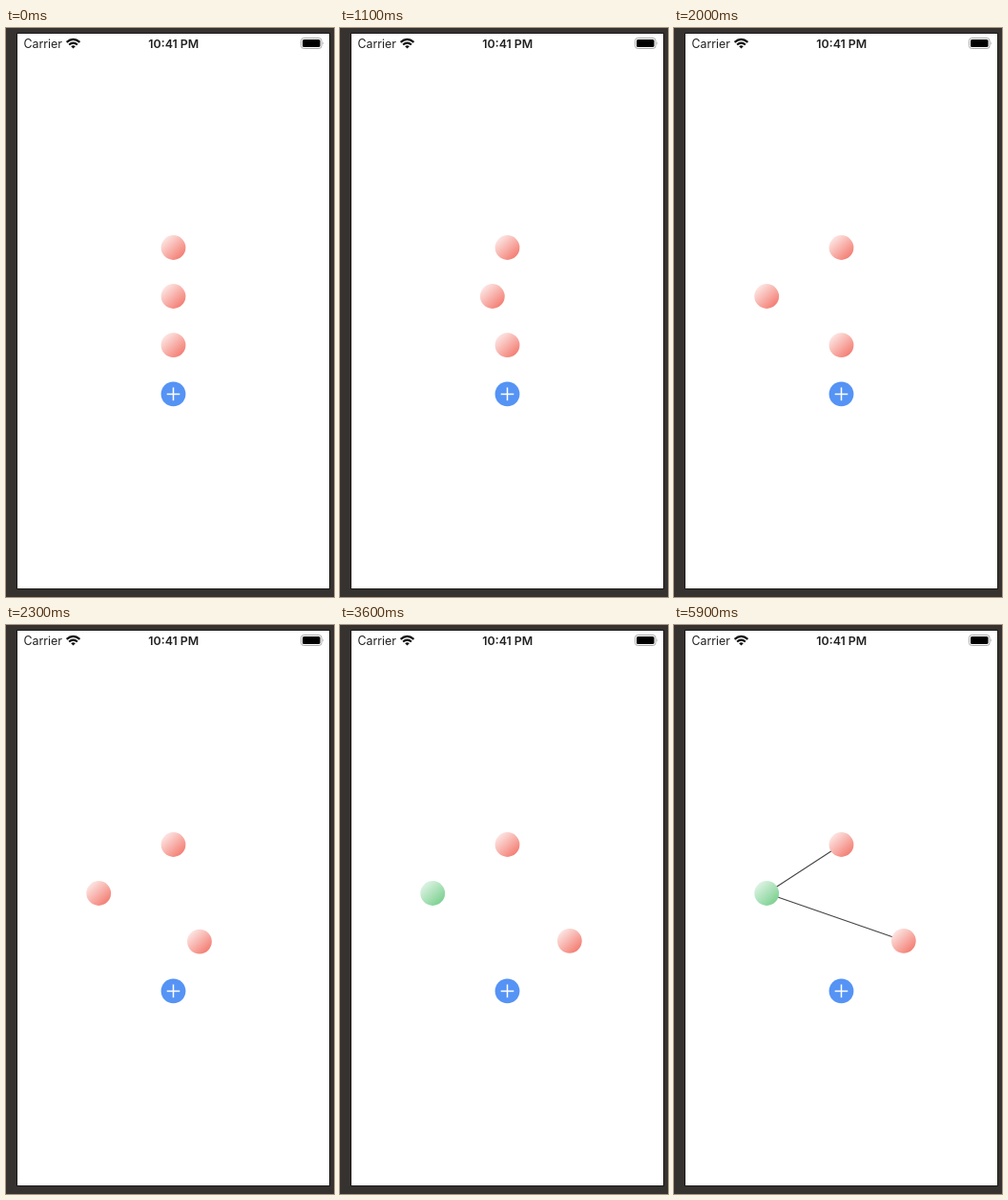
An HTML page that plays this animation: 344 by 596 pixels, repeating every 8000 ms.

```html
<!DOCTYPE html>
<html lang="en">
<head>
<meta charset="utf-8">
<title>Connecting nodes</title>
<style>
  html, body { margin: 0; width: 100%; height: 100%; overflow: hidden; background: #353230; }
  svg { display: block; width: 344px; height: 596px; }
  text { font-family: Inter, Roboto, sans-serif; fill: #222; }
</style>
</head>
<body>
<svg viewBox="0 0 344 596" xmlns="http://www.w3.org/2000/svg">
  <defs>
    <linearGradient id="red" x1=".12" y1=".1" x2=".86" y2=".9">
      <stop offset="0" stop-color="#fde9e7"/>
      <stop offset="1" stop-color="#f37b70"/>
    </linearGradient>
    <linearGradient id="green" x1=".12" y1=".1" x2=".86" y2=".9">
      <stop offset="0" stop-color="#e0f4e6"/>
      <stop offset="1" stop-color="#7ad08f"/>
    </linearGradient>
  </defs>

  <rect width="344" height="596" fill="#353230"/>
  <rect x="11" y="5" width="329" height="583" fill="#1c1a19"/>
  <rect x="12" y="6" width="327" height="581" fill="#fff"/>

  <text x="18.4" y="20.9" font-size="12.4">Carrier</text>
  <g fill="none" stroke="#111" stroke-width="2.1">
    <path d="M63.6 14.9 Q70.5 8.7 77.4 14.9"/>
    <path d="M66.1 17.5 Q70.5 13.7 74.9 17.5"/>
  </g>
  <path d="M68.2 19.3 Q70.5 17.4 72.8 19.3 L70.5 21.6Z" fill="#111"/>
  <text x="175.8" y="20.9" font-size="12.4" font-weight="600" text-anchor="middle">10:41 PM</text>
  <rect x="309.5" y="10.5" width="21.5" height="11" rx="2.8" fill="none" stroke="#aaa"/>
  <rect x="311" y="12" width="18.5" height="8" rx="1.6" fill="#000"/>
  <path d="M332.2 14.2 q1.6 1.8 0 3.6Z" fill="#aaa"/>

  <g stroke="#444" stroke-width="1.15">
    <line id="upper" x1="97.2" y1="281" x2="175.5" y2="230"/>
    <line id="lower" x1="97.2" y1="281" x2="240.8" y2="330.8"/>
  </g>
  <circle cx="175.5" cy="230" r="12.9" fill="url(#red)"/>
  <circle id="left" r="12.9"/>
  <circle id="right" r="12.9" fill="url(#red)"/>

  <circle cx="175.5" cy="383.4" r="12.9" fill="#5593f5"/>
  <path d="M168.7 383.4h13.6M175.5 376.6v13.6" stroke="#fff" stroke-width="1.5"/>
</svg>
<script>
const LOOP = 8000, STEP = 100;
const $ = id => document.getElementById(id);
const left = $('left'), right = $('right');

// Share of each drag covered after every step
const leftDrag = { start: 1100, path: [0.2, 0.52, 0.79, 0.91, 0.97, 0.99, 1] };
const rightDrag = { start: 2200, path: [0.14, 0.42, 0.7, 0.88, 0.97, 1] };

function progress({ start, path }, t) {
  if (t < start) return 0;
  return path[Math.min(Math.floor((t - start) / STEP), path.length - 1)];
}

const mix = (a, b, k) => a + (b - a) * k;

function place(node, from, to, k) {
  node.setAttribute('cx', mix(from[0], to[0], k));
  node.setAttribute('cy', mix(from[1], to[1], k));
}

const show = (id, on) => $(id).setAttribute('visibility', on ? 'visible' : 'hidden');

function draw(t) {
  place(left, [175.5, 281], [97.2, 281], progress(leftDrag, t));
  place(right, [175.5, 332.2], [240.8, 330.8], progress(rightDrag, t));
  left.setAttribute('fill', t < 3600 ? 'url(#red)' : 'url(#green)');
  show('upper', t >= 4700);
  show('lower', t >= 5800);
}

const began = performance.now();
function tick() {
  draw((performance.now() - began) % LOOP);
  requestAnimationFrame(tick);
}
draw(0);
requestAnimationFrame(tick);
</script>
</body>
</html>
```
